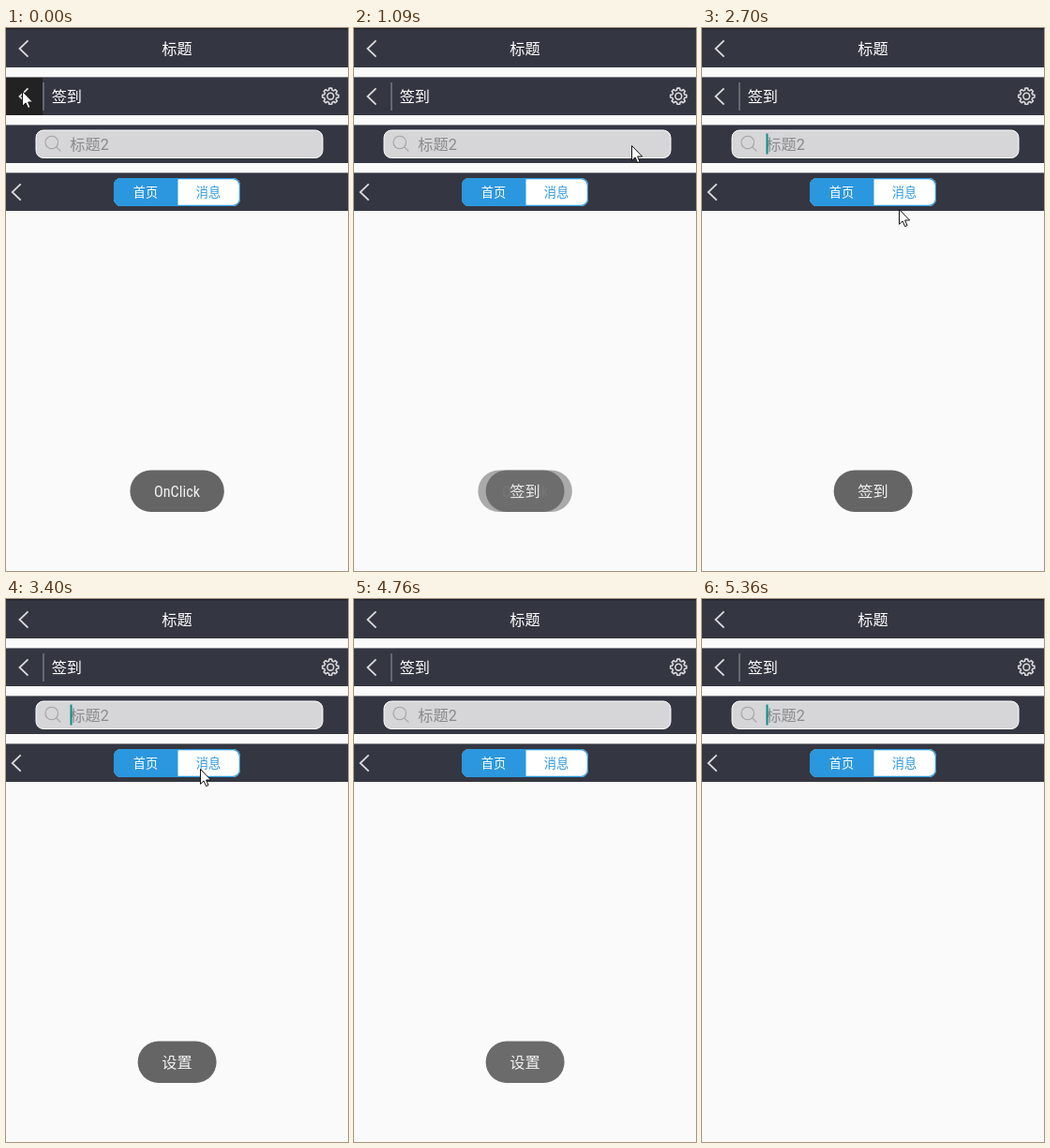
Write an HTML page that moves like this. It is 365 px wide and 579 px high and loops after 5460 ms.

```html
<!DOCTYPE html>
<html lang="zh-CN">
<head>
<meta charset="utf-8">
<title>标题</title>
<style>
  html, body { margin: 0; width: 100%; height: 100%; overflow: hidden; background: #fafafa; }
  svg { display: block; width: 365px; height: 579px; }
  text { font: 16.2px Roboto, "Noto Sans CJK SC", "Noto Sans CJK", sans-serif; fill: #fff; }
  .strong { font-weight: 500; }
  .mid { text-anchor: middle; }
  .tab { font-size: 13.2px; text-anchor: middle; }
  .narrow { font-stretch: 75%; font-family: "Roboto Condensed", Roboto, sans-serif; }
  .line { fill: none; stroke: #d9dadc; stroke-width: 1.8; }
</style>
</head>
<body>
<svg viewBox="0 0 365 579">
  <defs>
    <path id="back" class="line" d="M9.5 -8.7L.5 0L9.5 8.7"/>
    <clipPath id="pill"><rect x="115" y="160" width="135" height="30" rx="8"/></clipPath>
  </defs>
  <rect width="365" height="579" fill="#fafafa"/>
  <rect width="365" height="2" fill="#20232c"/>
  <g id="bars" fill="#343741"></g>

  <use href="#back" x="14" y="22"/>
  <text class="mid strong" x="182.5" y="28">标题</text>

  <rect id="press" y="53" width="39" height="40" fill="#222"/>
  <use href="#back" x="14" y="73"/>
  <rect x="39.2" y="58" width="1.5" height="30" fill="#777a81"/>
  <text class="strong" x="48.7" y="79">签到</text>
  <g class="line" style="stroke-width:1.6" transform="translate(346.3 72.7)">
    <path id="gear" stroke-linejoin="round"/>
    <circle r="3.4"/>
  </g>

  <rect x="32" y="109" width="306" height="29.5" rx="8" fill="#d6d5d7" stroke="#fff"/>
  <path d="M53.6 126.8L58.3 131.3M55.6 122a6.8 6.8 0 1 0 -13.6 0a6.8 6.8 0 1 0 13.6 0" fill="none" stroke="#a2a2a4" stroke-width="1.1"/>
  <text x="68.3" y="130" style="fill:#8a8a8c">标题2</text>
  <rect id="caret" x="68.5" y="112.5" width="2" height="22" fill="#0b8f83"/>

  <use href="#back" x="6.2" y="175"/>
  <g clip-path="url(#pill)">
    <rect x="115" y="160" width="135" height="30" fill="#fff"/>
    <rect id="half" y="160" width="68.5" height="30" fill="#2b97de"/>
  </g>
  <rect x="115.6" y="160.6" width="133.8" height="28.8" rx="7.4" fill="none" stroke="#2b97de" stroke-width="1.2"/>
  <text id="home" class="tab strong" x="149" y="180">首页</text>
  <text id="news" class="tab strong" x="216" y="180">消息</text>

  <g id="toasts"></g>
  <path id="cursor" d="M.5 .5V16.3L4.1 12.9L6.6 18.6L9 17.6L6.6 12H11.6Z" fill="#fff" stroke="#111"/>
</svg>
<script>
const LOOP = 5460;
const TICK = LOOP / 40;   // the screen refreshes 40 times per loop
const LEAD = 54;          // refreshes come slightly ahead of an even beat
const BLINK = 484;
const BLUE = "#2b97de";
const $ = id => document.getElementById(id);

// Stops of the pointer: time, x, y. It glides straight from one to the next.
const stops = [
  [600, 17, 67], [820, 74, 112], [1092, 296, 125], [1501, 345, 73],
  [1638, 340, 64], [1911, 343, 67], [2047, 400, 130], [2184, 357, 209],
  [2457, 262, 211], [2730, 210, 193], [3549, 206, 178], [3958, 156, 171],
  [4231, 157, 182], [4504, 236, 488], [4777, 308, 650]
];

$("bars").innerHTML = [0, 1, 2, 3]
  .map(i => `<rect y="${1.4 + 51 * i}" width="365" height="40.6"/>`).join("");

function gearPath(teeth, inner, outer) {
  const step = Math.PI * 2 / teeth;
  const points = [];
  for (let i = 0; i < teeth; i++) {
    for (const [offset, r] of [[-.34, inner], [-.2, outer], [.2, outer], [.34, inner]]) {
      const a = (i + offset) * step;
      points.push((r * Math.cos(a)).toFixed(2) + " " + (r * Math.sin(a)).toFixed(2));
    }
  }
  return "M" + points.join("L") + "Z";
}
$("gear").setAttribute("d", gearPath(8, 6.7, 8.7));

function toast(label, width, style) {
  return `<g><rect x="${182.6 - width / 2}" y="471.5" width="${width}" height="44.5" rx="22.2" fill="#656565"/>
    <text class="mid ${style}" x="182.5" y="500" style="fill:#f2f2f2">${label}</text></g>`;
}
$("toasts").innerHTML = toast("OnClick", 100.5, "narrow") + toast("签到", 84, "") + toast("设置", 84, "");
const toasts = [...$("toasts").children];

const ramp = (t, from, to) => Math.min(1, Math.max(0, (t - from) / (to - from)));
const ease = (t, from, to) => (1 - Math.cos(Math.PI * ramp(t, from, to))) / 2;
const fadeIn = (t, at) => ease(t, at - 40, at + 260);
const fadeOut = (t, at) => 1 - ease(t, at, at + 400);
const show = (node, on) => node.setAttribute("visibility", on ? "visible" : "hidden");

function pointerAt(t) {
  const next = stops.findIndex(stop => stop[0] > t);
  const b = stops.at(next);
  const a = next > 0 ? stops[next - 1] : b;
  const p = a === b ? 1 : ramp(t, a[0], b[0]);
  return [1, 2].map(i => Math.round(a[i] + (b[i] - a[i]) * p));
}

function draw(t) {
  const held = Math.floor((t + LEAD) / TICK) * TICK;
  $("cursor").setAttribute("transform", `translate(${pointerAt(held)})`);
  show($("press"), t < 700);
  show($("caret"), Math.floor((t - 400) / BLINK) % 2 === 0);

  const second = t >= 3540 && t < 4210;
  $("half").setAttribute("x", second ? 181.5 : 115);
  $("home").style.fill = second ? BLUE : "#fff";
  $("news").style.fill = second ? "#fff" : BLUE;

  const alphas = [
    fadeOut(held, 900),
    fadeIn(held, 900) * fadeOut(held, 2780),
    fadeIn(held, 2780) * (1 - ease(held, 4720, 5160))
  ];
  toasts.forEach((node, i) => node.setAttribute("opacity", alphas[i].toFixed(3)));
}

const start = performance.now();
function tick() {
  draw((performance.now() - start) % LOOP);
  requestAnimationFrame(tick);
}
tick();
</script>
</body>
</html>
```
